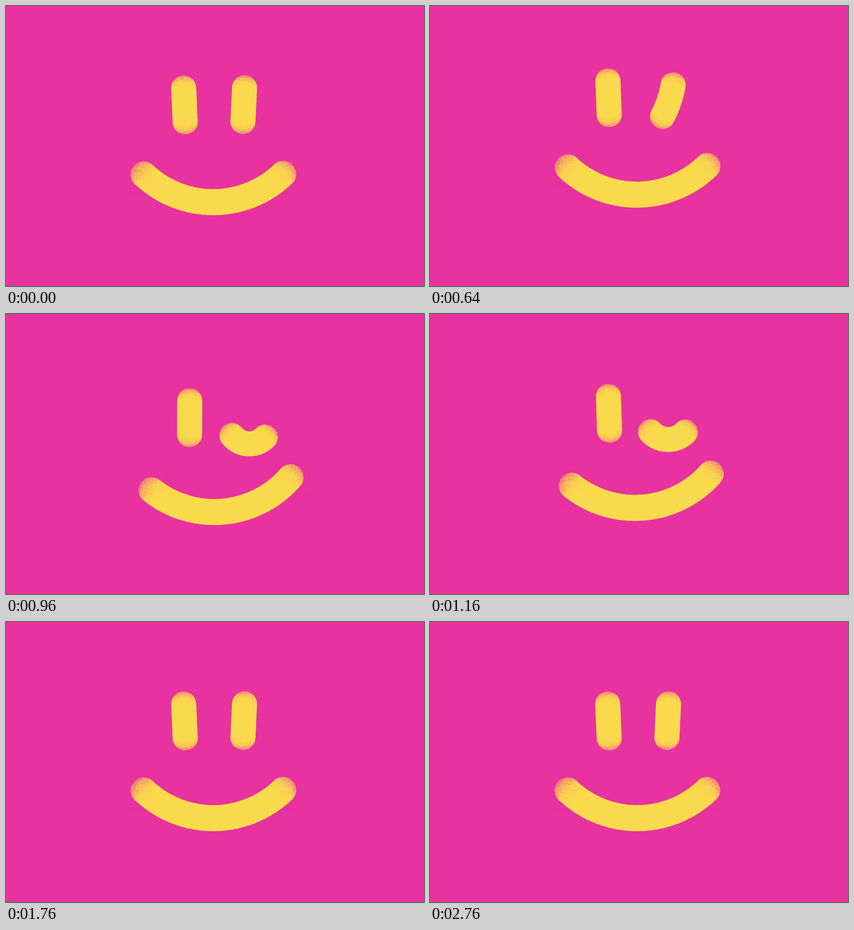
Write an HTML page with a canvas that moves like this. It is 800 px wide and 536 px high and loops after 2800 ms.

```html
<!DOCTYPE html>
<html lang="en">
<head>
<meta charset="utf-8">
<title>Winking smile</title>
<style>
html, body { margin: 0; width: 100%; height: 100%; overflow: hidden; background: #e7329f; }
canvas { display: block; }
</style>
</head>
<body>
<canvas id="stage" width="800" height="536"></canvas>
<script>
const PINK = '#e7329f', YELLOW = '#fada4d';
const LOOP = 2800, STEP = 40, DEG = Math.PI / 180;
const ctx = document.getElementById('stage').getContext('2d');

const mix = (a, b, u) => a + (b - a) * u;
const clamp = v => Math.min(1, Math.max(0, v));

function ease(t, from, to) {
  const u = clamp((t - from) / (to - from));
  return u * u * (3 - 2 * u);
}

// Rises from a to b, holds, falls from c to d.
const pulse = (t, a, b, c, d) => ease(t, a, b) * (1 - ease(t, c, d));

let seed = 1;
function rnd() {
  seed = seed + 0x6D2B79F5 | 0;
  let x = Math.imul(seed ^ seed >>> 15, seed | 1);
  x ^= x + Math.imul(x ^ x >>> 7, x | 61);
  return ((x ^ x >>> 14) >>> 0) / 4294967296;
}

// Points of an arc around the middle (cx, cy) of its chord.
function arc(cx, cy, half, deg, bend) {
  const dx = Math.cos(deg * DEG), dy = Math.sin(deg * DEG);
  const s = Math.max(bend, 0.01);
  const R = (half * half + s * s) / (2 * s), phi = 2 * Math.atan(s / half);
  const pts = [];
  for (let i = 0; i <= 60; i++) {
    const q = phi * (i / 30 - 1);
    const x = R * Math.sin(q), y = R * (Math.cos(q) - Math.cos(phi));
    pts.push([cx + dx * x - dy * y, cy + dy * x + dx * y]);
  }
  return pts;
}

// Faint specks on both sides of the outline.
function roughEdge(pts, r) {
  ctx.globalAlpha = 0.35;
  for (let i = 1; i < pts.length; i++) {
    const [x0, y0] = pts[i - 1], [x1, y1] = pts[i];
    const dx = x1 - x0, dy = y1 - y0, len = Math.hypot(dx, dy);
    for (const side of [-r, r]) {
      if (rnd() > len * 0.4) continue;
      const u = rnd(), d = side / len;
      ctx.fillStyle = rnd() < 0.5 ? YELLOW : PINK;
      ctx.fillRect(Math.floor(x0 + dx * u - dy * d), Math.floor(y0 + dy * u + dx * d), 1, 1);
    }
  }
}

// Fades a round end into fine grain, strongest at the rim.
function grainCap([cx, cy], [px, py], r, depth, amount) {
  const len = Math.hypot(cx - px, cy - py);
  const dx = (cx - px) / len, dy = (cy - py) / len, box = Math.ceil(r * 1.5);
  const x0 = Math.round(cx), y0 = Math.round(cy);
  ctx.fillStyle = PINK;
  for (let y = y0 - box; y <= y0 + box; y++) {
    for (let x = x0 - box; x <= x0 + box; x++) {
      const ox = x + 0.5 - cx, oy = y + 0.5 - cy;
      const u = ox * dx + oy * dy, d = Math.hypot(ox, oy);
      if (d > r + 1 && u > 0) continue;
      const e = u > 0 ? r - Math.sqrt(u * d) : r - u;
      const p = amount * Math.exp(-Math.pow(Math.max(e, 0) / depth, 1.2));
      ctx.globalAlpha = clamp(p + (rnd() - 0.5) * Math.min(0.5, 2 * p));
      ctx.fillRect(x, y, 1, 1);
    }
  }
}

function stroke(pts, r, capA, capB) {
  ctx.globalAlpha = 1;
  ctx.strokeStyle = YELLOW;
  ctx.lineWidth = 2 * r;
  ctx.lineCap = ctx.lineJoin = 'round';
  ctx.beginPath();
  pts.forEach(([x, y]) => ctx.lineTo(x, y));
  ctx.stroke();
  roughEdge(pts, r);
  const n = pts.length - 1;
  grainCap(pts[0], pts[1], r, ...capA);
  grainCap(pts[n], pts[n - 1], r, ...capB);
  ctx.globalAlpha = 1;
}

function draw(frame) {
  const t = frame * STEP;
  seed = frame * 7919 + 17;

  const hop = 17 * pulse(t, 395, 585, 595, 760) + 8 * pulse(t, 1190, 1290, 1300, 1500);
  const dy = 9 * pulse(t, 740, 900, 960, 1200) - hop;
  const eyeX = 10 * pulse(t, 610, 910, 960, 1210);
  const eyeTilt = 3.5 * pulse(t, 600, 760, 820, 1300);
  const mouthX = 15 * pulse(t, 610, 950, 1020, 1300);
  const mouthTilt = -0.2 - 5.2 * pulse(t, 590, 890, 1100, 1440);
  const wink = pulse(t, 600, 750, 1160, 1290);
  const winkHalf = mix(30.5, 33.5, ease(t, 760, 1160));

  ctx.fillStyle = PINK;
  ctx.fillRect(0, 0, 800, 536);

  const eyeCap = [6, 0.6];
  stroke(arc(341.5 + eyeX, 189.5 + dy, 32.5, eyeTilt - 92.6, 0), 24, eyeCap, eyeCap);
  stroke(arc(mix(455, 454.3, wink) + eyeX, mix(188.8, 225, wink) + dy,
    mix(32.3, winkHalf, wink), eyeTilt - mix(87.3, 0, wink), 14.5 * wink), 24, eyeCap, eyeCap);

  // The mouth swings about a point left of its middle.
  const a = mouthTilt * DEG;
  stroke(arc(331 + 66 * Math.cos(a) + mouthX, 322.2 + 66 * Math.sin(a) + dy,
    133.5, mouthTilt, 53.5), 25, [13, 0.62], [10, 0.55]);
}

let start = null, shown = -1;
function tick(now) {
  if (start === null) start = now;
  const frame = Math.floor((now - start) % LOOP / STEP);
  if (frame !== shown) draw(shown = frame);
  requestAnimationFrame(tick);
}
draw(0);
requestAnimationFrame(tick);
</script>
</body>
</html>
```
